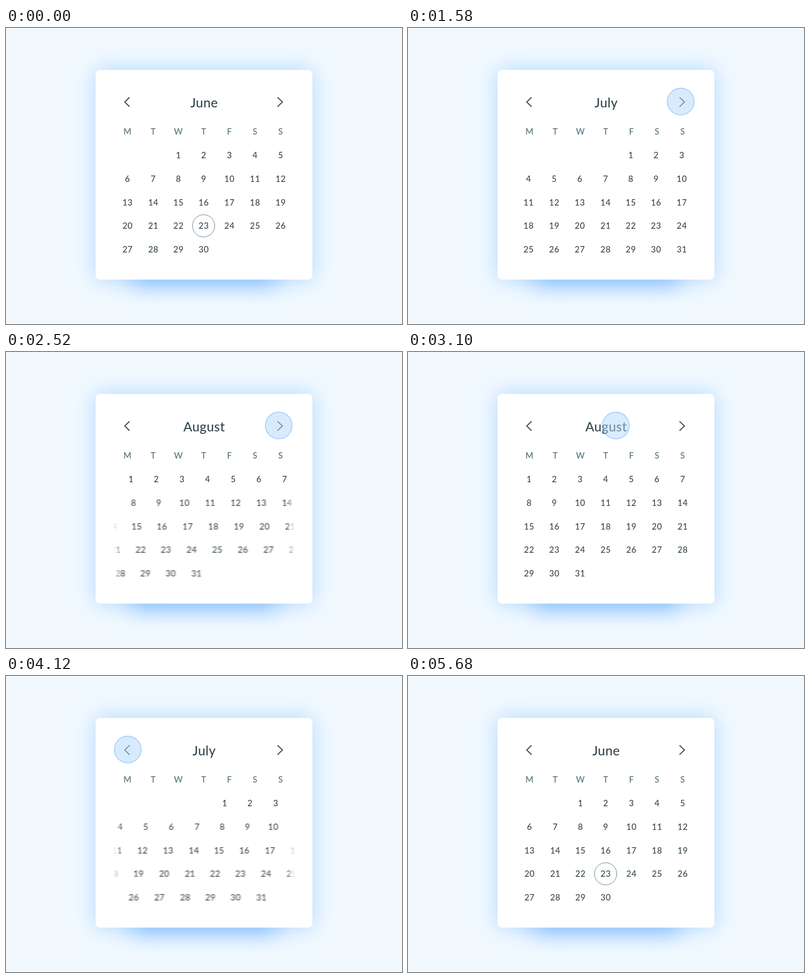
An HTML page for the animation above (6300 ms loop, 800 by 600 pixels).

```html
<!DOCTYPE html>
<html lang="en">
<head>
<meta charset="utf-8">
<title>Calendar</title>
<style>
  html, body { margin: 0; width: 100%; height: 100%; overflow: hidden; background: #f1f9ff; }
  .card {
    position: absolute; left: 181px; top: 85px; width: 438px; height: 425px;
    border-radius: 9px; background: #fff; overflow: hidden;
    box-shadow: 0 0 44px rgba(120, 185, 255, .55), 0 85px 40px -73px rgba(100, 170, 255, .65);
  }
  svg { display: block; }
  text {
    font: 500 17px Lato, "Open Sans", sans-serif; letter-spacing: .6px;
    text-anchor: middle; fill: #37474f; translate: .3px .2px;
  }
  .title { font-size: 26.3px; letter-spacing: .4px; }
  .head text { font-weight: 600; fill: #607d8b; }
  .arrow { fill: none; stroke: #37474f; stroke-width: 2; }
  .ring { fill: none; stroke: #607d8b; }

  .row { animation: slide 6300ms cubic-bezier(.45, 0, .5, 1) infinite backwards; }
  .june { animation: june 6300ms linear infinite; }
  .july { animation: july 6300ms linear infinite; }
  .august { animation: august 6300ms linear infinite; }
  .last { animation: last 6300ms linear infinite; }
  .tap {
    position: absolute; left: 0; top: 36px; width: 56px; height: 56px; box-sizing: border-box;
    border: 2px solid #58a8f6; border-radius: 50%; background: #b4d9fc; opacity: .51;
    animation: travel 6300ms cubic-bezier(.45, 0, .55, 1) infinite, press 6300ms ease-in-out infinite;
  }

  @keyframes slide {
    0%, 17.746% { transform: translateX(0); }
    23.937%, 33.492% { transform: translateX(101.7px); }
    41.27%, 58.889% { transform: translateX(-103.8px); }
    66.667%, 76.159% { transform: translateX(101.7px); }
    82.349%, 100% { transform: translateX(0); }
  }
  @keyframes june {
    0%, 19.683% { opacity: 1; }
    23.492%, 78.095% { opacity: 0; }
    81.905%, 100% { opacity: 1; }
  }
  @keyframes july {
    0%, 19.683% { opacity: 0; }
    23.492%, 35.556% { opacity: 1; }
    39.365%, 60.952% { opacity: 0; }
    64.762%, 78.095% { opacity: 1; }
    81.905%, 100% { opacity: 0; }
  }
  @keyframes august {
    0%, 35.556% { opacity: 0; }
    39.365%, 60.952% { opacity: 1; }
    64.762%, 100% { opacity: 0; }
  }
  @keyframes last {
    0%, 19.683% { opacity: 0; }
    23.492%, 78.095% { opacity: 1; }
    81.905%, 100% { opacity: 0; }
  }
  @keyframes travel {
    0%, 7.778% { translate: 441px 0; }
    13.651%, 45.159% { translate: 342px 0; }
    53.968%, 85.714% { translate: 37px 0; }
    91.429%, 100% { translate: -69px 0; }
  }
  @keyframes press {
    0%, 15.714%, 20.317%, 31.587%, 36.19%, 56.984%, 61.587%, 74.127%, 78.73%, 100% { scale: 1; opacity: .51; }
    18.095%, 33.968%, 59.365%, 76.508% { scale: .68; opacity: .67; }
  }
</style>
</head>
<body>
<div class="card">
  <svg width="438" height="425" viewBox="181 85 438 425">
    <defs>
      <linearGradient id="fade" gradientUnits="userSpaceOnUse" x1="217" y1="0" x2="584" y2="0">
        <stop offset="0" stop-color="#fff" stop-opacity="0"/>
        <stop offset=".046" stop-color="#fff"/>
        <stop offset=".954" stop-color="#fff"/>
        <stop offset="1" stop-color="#fff" stop-opacity="0"/>
      </linearGradient>
      <mask id="window" maskUnits="userSpaceOnUse" x="217" y="230" width="367" height="240">
        <rect x="217" y="230" width="367" height="240" fill="url(#fade)"/>
      </mask>
    </defs>
    <path class="arrow" d="M249.5 140.5 240 150l9.5 9.5M548.5 140.5 558.5 150l-10 9.5"/>
    <text class="title june" x="400" y="161">June</text>
    <text class="title july" x="400" y="161">July</text>
    <text class="title august" x="400" y="161">August</text>
    <g class="head" id="head"></g>
    <g id="days" mask="url(#window)"></g>
  </svg>
  <div class="tap"></div>
</div>
<script>
  const LOOP = 6300, STAGGER = 20, WEEK = 361.2;
  const COLS = [245.3, 297.3, 348.2, 399.2, 451.2, 503, 554.7];
  // start, duration and distance of each slide
  const SLIDES = [[1118, 390, 102], [2110, 490, 206], [3710, 490, 206], [4798, 390, 102]];
  const defs = document.querySelector('defs');
  const days = document.getElementById('days');
  const head = document.getElementById('head');

  function add(parent, name, attrs, text) {
    const el = document.createElementNS('http://www.w3.org/2000/svg', name);
    for (const key in attrs) el.setAttribute(key, attrs[key]);
    if (text) el.textContent = text;
    return parent.appendChild(el);
  }

  [...'MTWTFSS'].forEach((day, i) => add(head, 'text', { x: COLS[i], y: 216 }, day));

  // Each row is a window on the same strip of days, one week further on.
  const rows = [0, 1, 2, 3, 4].map(k => {
    const y = 264 + 47.75 * k;
    const filter = add(defs, 'filter', { id: 'blur' + k, 'color-interpolation-filters': 'sRGB' });
    const blur = add(filter, 'feGaussianBlur', { stdDeviation: '0 0' });
    const row = add(days, 'g', { class: 'row', style: `animation-delay:${k * STAGGER}ms` });
    const first = Math.max(1, 7 * k - 4), end = Math.min(31, 7 * k + 9);
    for (let d = first; d <= end; d++) {
      const cell = d + 1;
      const x = COLS[cell % 7] + WEEK * (Math.floor(cell / 7) - k);
      add(row, 'text', { x, y, class: d === 31 ? 'last' : '' }, d);
      if (k === 3 && d === 23) add(row, 'circle', { class: 'ring june', cx: x, cy: 401, r: 22.5 });
    }
    return { row, blur };
  });

  function motionBlur(t, k) {
    for (const [start, span, dist] of SLIDES) {
      const u = (t - start - k * STAGGER) / span;
      if (u > 0 && u < 1) return 5.8 * dist / span * Math.sin(Math.PI * u) ** 2;
    }
    return 0;
  }

  let origin;
  function draw(now) {
    origin ??= now;
    const t = (now - origin) % LOOP;
    rows.forEach(({ row, blur }, k) => {
      const size = motionBlur(t, k);
      if (size > .05) {
        blur.setAttribute('stdDeviation', size.toFixed(2) + ' 0');
        row.setAttribute('filter', `url(#blur${k})`);
      } else {
        row.removeAttribute('filter');
      }
    });
    requestAnimationFrame(draw);
  }
  requestAnimationFrame(draw);
</script>
</body>
</html>
```
